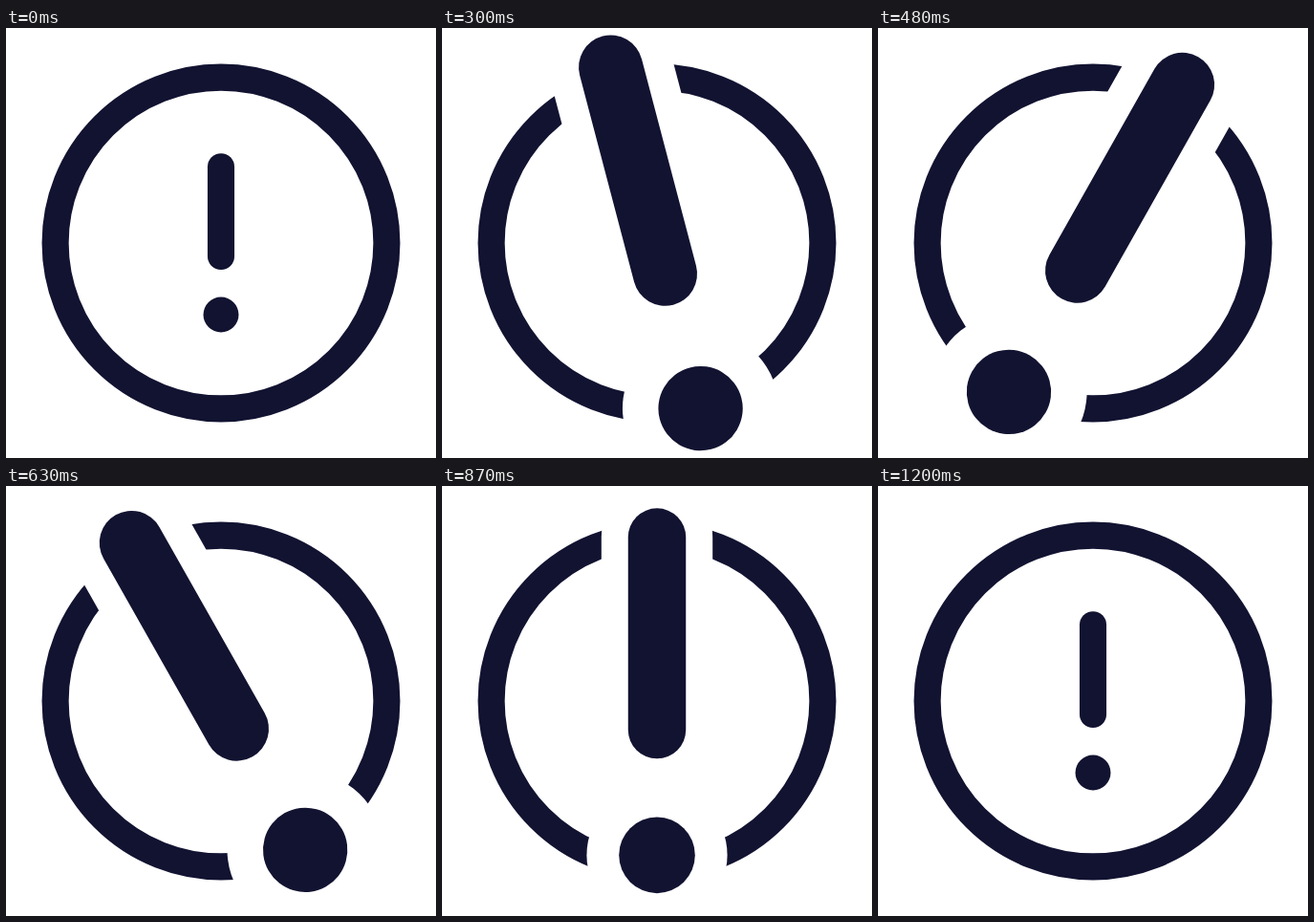
Write an HTML page that moves like this. It is 450 px wide and 450 px high and loops after 1.23 s.

```html
<!DOCTYPE html>
<html lang="en">
<head>
<meta charset="utf-8">
<title>Alert icon</title>
<style>
  html, body { margin: 0; width: 100%; height: 100%; overflow: hidden; background: #fff; }
  svg { display: block; width: 100%; height: 100%; }
  line { stroke-linecap: round; }
</style>
</head>
<body>
<svg viewBox="-225 -225 450 450">
  <circle r="173.4" fill="none" stroke="#121331" stroke-width="28.1"/>
  <g id="mark">
    <g fill="#fff" stroke="#fff">
      <line y1="-79.7" y2="14" stroke-width="54.1"/>
      <circle cy="75" r="34.2" stroke="none"/>
    </g>
    <g fill="#121331" stroke="#121331">
      <line y1="-79.7" y2="14" stroke-width="28.1"/>
      <circle cy="75" r="18.5" stroke="none"/>
    </g>
  </g>
</svg>
<script>
  const LOOP = 1230;
  const mark = document.getElementById('mark');

  // Keys are [time in ms, value] pairs.
  const scaleKeys = [[0, 1], [265, 2.387], [795, 2.387], [1085, 1]];
  const angleKeys = [[257, 0], [346, -30], [489, 30], [639, -30], [793, 0]];

  const ease = u => u * u * (3 - 2 * u);

  function valueAt(keys, t) {
    if (t <= keys[0][0]) return keys[0][1];
    for (let i = 1; i < keys.length; i++) {
      const [t0, v0] = keys[i - 1], [t1, v1] = keys[i];
      if (t < t1) return v0 + (v1 - v0) * ease((t - t0) / (t1 - t0));
    }
    return keys[keys.length - 1][1];
  }

  function draw() {
    const t = performance.now() % LOOP;
    mark.setAttribute('transform',
      `rotate(${valueAt(angleKeys, t)}) scale(${valueAt(scaleKeys, t)})`);
    requestAnimationFrame(draw);
  }
  draw();
</script>
</body>
</html>
```
